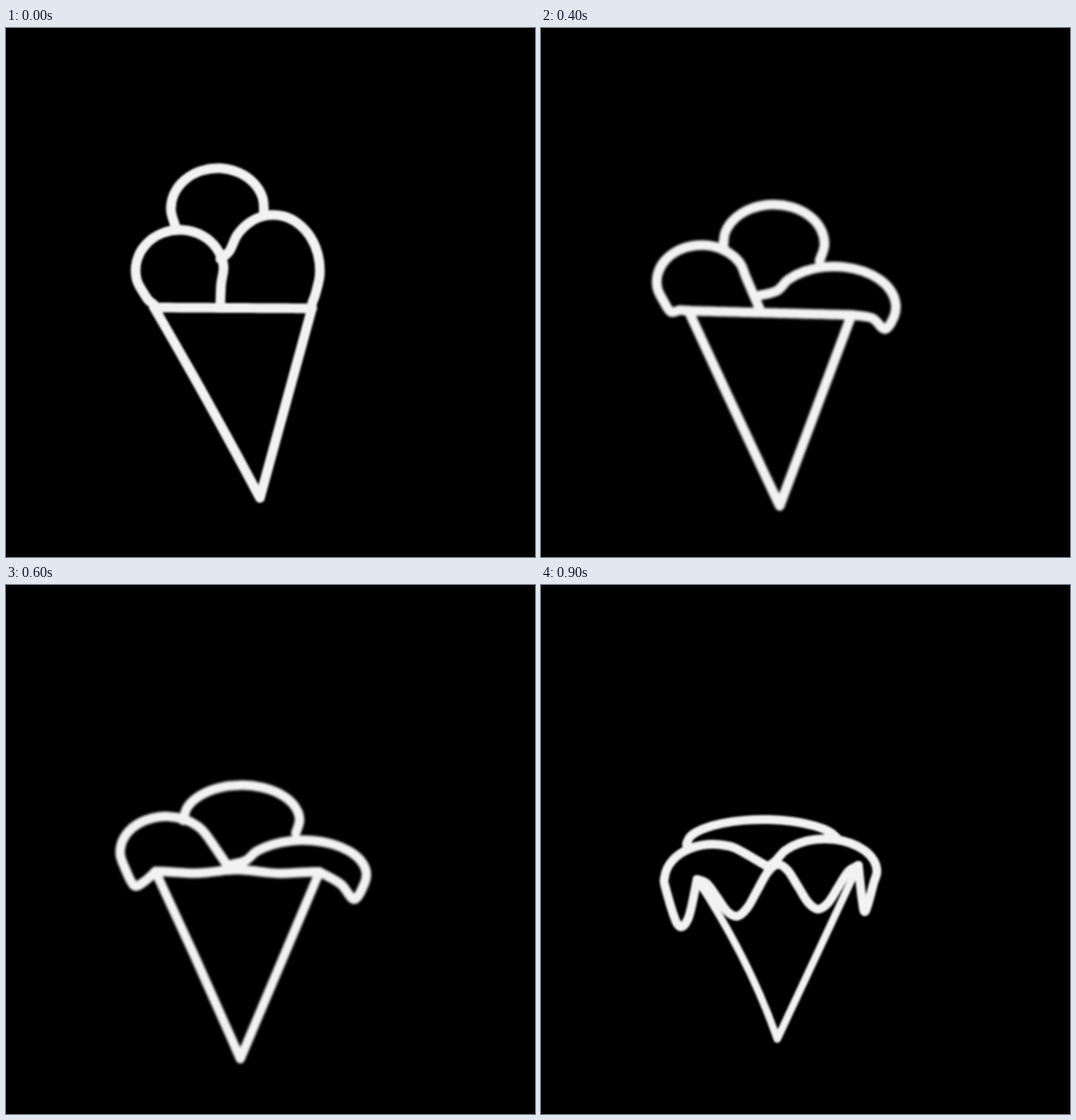
Write an HTML page that moves like this. It is 600 by 600 pixels and loops after 1 s.

```html
<!DOCTYPE html>
<html lang="en">
<head>
<meta charset="utf-8">
<title>Melting ice cream</title>
<style>
  html, body { margin: 0; width: 100%; height: 100%; overflow: hidden; background: #000; }
  svg { display: block; width: 100vw; height: 100vh; }
  path { fill: none; stroke: #f3f2f3; stroke-linecap: round; stroke-linejoin: round; }
</style>
</head>
<body>
<svg viewBox="0 0 600 600">
  <g id="ice">
    <path id="top"/><path id="left"/><path id="right"/><path id="rim"/><path id="cone"/>
  </g>
</svg>
<script>
// Scoops are arcs: centre x, y, radii x, y, start and end angle in degrees.
// Drips lead from the rim into the left arc and from the right arc back to it.
const whole = {
  rimL: [168, 317], rimR: [347, 318], tip: [288, 533], bow: 3, sag: 0,
  top: [240, 205, 53, 46, 155, 368],
  left: [197, 275, 50, 46, 140, 380], leftDrip: [[168, 314], [163, 310]], leftEnd: [243, 316],
  right: [303, 275, 53, 63, 200, 385], rightDrip: [[348, 310], [347, 314]], rightStart: [243, 262]
};
const sagging = {
  rimL: [167, 322], rimR: [354, 328], tip: [265, 545], bow: -2, sag: 0,
  top: [272, 258, 59, 44, 180, 391],
  left: [177, 292, 51, 40, 150, 343], leftDrip: [[154, 322], [142, 326]], leftEnd: [249, 318],
  right: [342, 330, 76, 40, 205, 370], rightDrip: [[404, 352], [385, 334]], rightStart: [250, 317]
};
const melted = {
  rimL: [177, 334], rimR: [360, 318], tip: [268, 515], bow: 14, sag: 1,
  top: [252, 294, 87, 28, 180, 350],
  left: [195, 335, 55, 41, 170, 300], leftDrip: [[167, 378], [155, 385]], leftEnd: [258, 320],
  right: [322, 325, 59, 37, 200, 380], rightDrip: [[368, 370], [364, 355]], rightStart: [257, 320]
};

const $ = id => document.getElementById(id);

// Blends numbers, arrays and objects alike
function mix(a, b, u) {
  if (typeof a === 'number') return a + (b - a) * u;
  if (Array.isArray(a)) return a.map((v, i) => mix(v, b[i], u));
  return Object.fromEntries(Object.keys(a).map(k => [k, mix(a[k], b[k], u)]));
}

const sample = (n, f) => Array.from({ length: n + 1 }, (_, i) => f(i / n));

const arc = ([x, y, rx, ry, from, to]) => sample(9, u => {
  const a = mix(from, to, u) * Math.PI / 180;
  return [x + rx * Math.cos(a), y + ry * Math.sin(a)];
});

// Straight at first; two drips and a raised middle appear as it melts
const rimLine = ({ rimL, rimR, sag }) => sample(16, u => {
  const [x, y] = mix(rimL, rimR, u);
  const drips = 52 * sag ** 2 * Math.sin(2 * Math.PI * u) ** 2;
  return [x, y + drips - 9 * sag * Math.sin(Math.PI * u)];
});

// Catmull-Rom spline through the points
function spline(pts) {
  const at = i => pts[Math.max(0, Math.min(pts.length - 1, i))];
  let d = 'M' + pts[0];
  for (let i = 0; i < pts.length - 1; i++) {
    const [p, a, b, n] = [at(i - 1), at(i), at(i + 1), at(i + 2)];
    const c1 = a.map((v, k) => v + (b[k] - p[k]) / 6);
    const c2 = b.map((v, k) => v - (n[k] - a[k]) / 6);
    d += `C${c1} ${c2} ${b}`;
  }
  return d;
}

function draw(stage) {
  const k = Math.min(1, Math.floor(stage));
  const u = stage - k;
  const p = k ? mix(sagging, melted, u) : mix(whole, sagging, u);
  const soft = Math.sin(Math.PI * u);
  const [midX, midY] = mix(p.rimL, p.tip, 0.5);

  $('top').setAttribute('d', spline(arc(p.top)));
  $('left').setAttribute('d', spline([p.rimL, ...p.leftDrip, ...arc(p.left), p.leftEnd]));
  $('right').setAttribute('d', spline([p.rightStart, ...arc(p.right), ...p.rightDrip, p.rimR]));
  $('rim').setAttribute('d', spline(rimLine(p)));
  $('cone').setAttribute('d', `M${p.rimL}Q${midX + p.bow} ${midY} ${p.tip}L${p.rimR}`);

  $('ice').setAttribute('stroke-width', 11 - p.sag);
  $('cone').setAttribute('stroke-width', 11 - 2.5 * p.sag);
  $('ice').style.filter = `blur(${1.2 + soft * 0.5}px)`;
}

const timeline = [0, 0.25, 0.5, 0.5, 0.75, 1, 1.25, 1.5, 1.75, 2];
let shown = -1;
function tick() {
  const slot = Math.floor(performance.now() % 1000 / 100);
  if (slot !== shown) draw(timeline[shown = slot]);
  requestAnimationFrame(tick);
}
tick();
</script>
</body>
</html>
```
